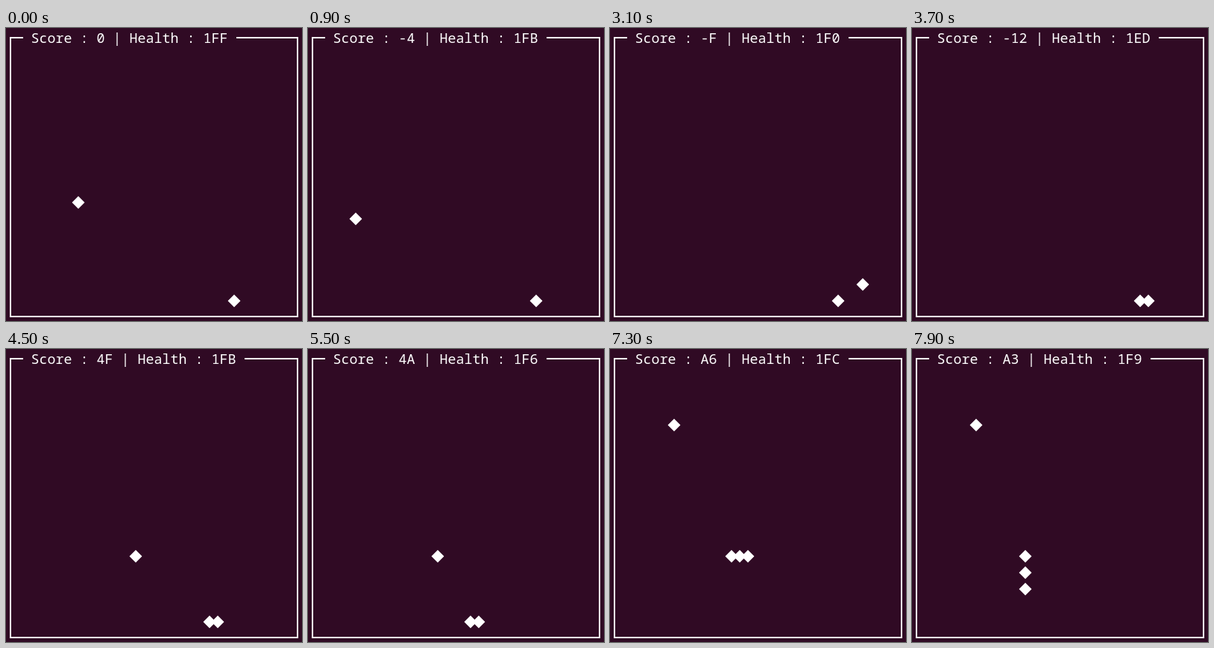
An HTML page that plays this animation: 397 px wide and 393 px high, repeating every 8 s.

```html
<!DOCTYPE html>
<html lang="en">
<head>
<meta charset="utf-8">
<title>Terminal snake</title>
<style>
  html, body { margin: 0; width: 100%; height: 100%; overflow: hidden; background: #300a24; }
  svg { display: block; width: 397px; height: 393px; }
  text { font: 18.333px "Noto Sans Mono", "DejaVu Sans Mono", monospace; fill: #fff; white-space: pre; }
  #frame { fill: none; stroke: #fff; stroke-width: 2; }
  #cells { fill: #fff; }
</style>
</head>
<body>
<svg viewBox="0 0 397 393">
  <path id="frame"/>
  <text id="title" x="33.5" y="20"></text>
  <path id="cells"/>
</svg>
<script>
const LOOP = 8000, CELL_W = 11, CELL_H = 22, LAST_COL = 32, MAX_HEALTH = 0x1FF;
const $ = id => document.getElementById(id);

// Move times in tenths of a second: an uneven start, then a steady beat
const ticks = [2, 4, 6, 9, 11, 13, 15, 17, 20, 21, 23, 25, 27, 30, 31, 33, 35, 37, 40];
for (let t = 41; t < 80; t += 2) ticks.push(t);

const route = [...'DLLLLDDDD' + 'L'.repeat(8) + 'D' + 'L'.repeat(11) + 'UUUULLLLDD'];
const steps = { L: [-1, 0], D: [0, 1], U: [0, -1] };
const foods = [[27, 16], [15, 12], [7, 4]];

function simulate() {
  let body = [[8, 10]], score = 0, health = MAX_HEALTH, eaten = 0;
  const states = [];
  const record = time => states.push({ time, score, health, cells: [...body, foods[eaten]] });
  record(0);
  route.forEach((key, i) => {
    const [dx, dy] = steps[key];
    const head = [body[0][0] + dx || LAST_COL, body[0][1] + dy];
    const ate = head.join() === foods[eaten].join();
    if (ate) {
      score += 100;
      health = MAX_HEALTH - body.length;
      eaten++;
    } else {
      score--;
      health--;
    }
    body = [head, ...(ate ? body : body.slice(0, -1))];
    record(ticks[i] * 100);
  });
  return states;
}

const states = simulate();
const hex = n => n.toString(16).toUpperCase();
const diamond = ([col, row]) =>
  `M${9 + col * CELL_W} ${14 + row * CELL_H - 8.5}l8.5 8.5l-8.5 8.5l-8.5-8.5z`;

function draw({ score, health, cells }) {
  const title = `Score : ${hex(score)} | Health : ${hex(health)}`;
  const gapEnd = 33.5 + (title.length + 1) * CELL_W;
  $('title').textContent = title;
  $('frame').setAttribute('d', `M23 13H6V387H391V13H${Math.round(gapEnd)}`);
  $('cells').setAttribute('d', cells.map(diamond).join(''));
}

let shown;
function tick() {
  const time = performance.now() % LOOP;
  const state = states.findLast(s => s.time <= time);
  if (state !== shown) draw(shown = state);
  requestAnimationFrame(tick);
}
tick();
</script>
</body>
</html>
```
